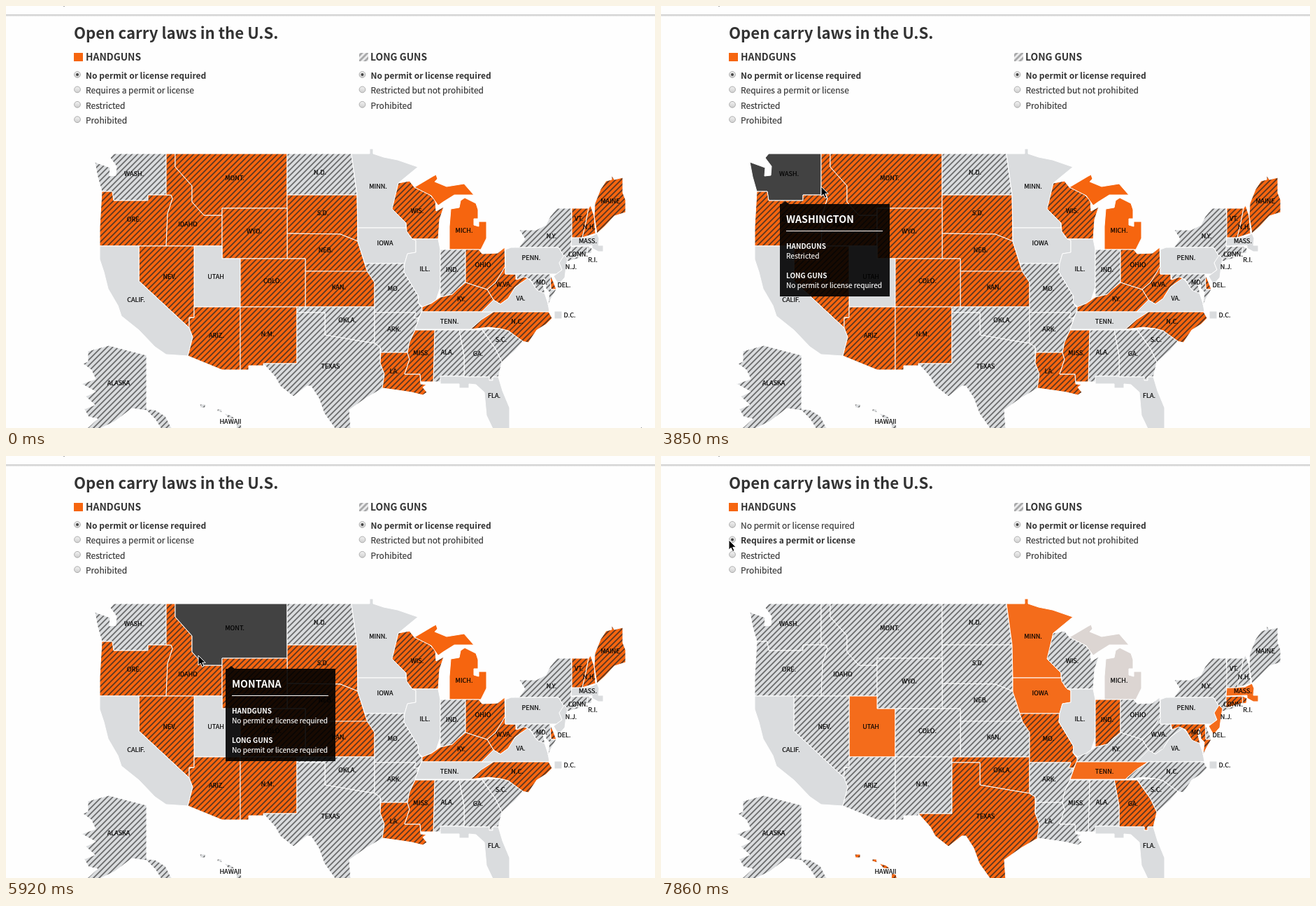
Recreate the animation shown at these times as an HTML page. Size 928x603 px, loop 8 s.

```html
<!DOCTYPE html>
<html lang="en">
<head>
<meta charset="utf-8">
<title>Open carry laws</title>
<style>
html, body { margin: 0; width: 100%; height: 100%; overflow: hidden; background: #fefefe; }
svg { display: block; width: 928px; height: 603px; --on: #f6650f; --off: #dadcde;
  font-family: "Noto Sans CJK SC", "Noto Sans CJK JP", "Noto Sans CJK KR", "Noto Sans CJK", "Open Sans", sans-serif; }
text { fill: #333; }
.title { font-size: 22.2px; font-weight: 700; }
.head { font-size: 13.9px; font-weight: 600; }
.option { font-size: 12px; }
.option text { stroke: #333; stroke-width: .15px; }
.option.picked text { font-weight: 700; stroke: none; }
.option .dot { display: none; }
.option.picked .dot { display: block; }
#states path { fill: var(--off); stroke: #fff; stroke-width: 1; stroke-linejoin: round; }
#states .h { fill: url(#offHatch); }
.none .o, .permit .p { fill: var(--on) !important; }
.none .o.h, .permit .p.h { fill: url(#onHatch) !important; }
.permit .in { fill: var(--fadeIn) !important; }
.permit .out { fill: var(--fadeOut) !important; }
#states .hover { fill: #424242 !important; }
#labels text { font-size: 9.1px; fill: #000; stroke: #000; stroke-width: .2px; text-anchor: middle; }
#tip text { fill: #fff; font-size: 10.1px; stroke: #fff; stroke-width: .15px; }
#tip .b { font-weight: 700; font-size: 10px; stroke: none; }
#tip #place { font-size: 14.2px; font-weight: 600; stroke: none; }
</style>
</head>
<body>
<svg id="stage" class="none" viewBox="0 0 928 603">
<defs>
  <path id="slash" d="M-2 2L2 -2M-2 10L10 -2M6 10L10 6"/>
  <pattern id="offHatch" width="8" height="8" patternUnits="userSpaceOnUse">
    <rect width="8" height="8" fill="#dadcde"/><use href="#slash" stroke="#6b6c6d" stroke-width="1.8"/>
  </pattern>
  <pattern id="onHatch" width="8" height="8" patternUnits="userSpaceOnUse">
    <rect width="8" height="8" fill="#f6650f"/><use href="#slash" stroke="#5c3722" stroke-width="1.8"/>
  </pattern>
  <pattern id="keyHatch" width="8" height="8" patternUnits="userSpaceOnUse">
    <rect width="8" height="8" fill="#ececed"/><use href="#slash" stroke="#a8a9aa" stroke-width="2.8"/>
  </pattern>
  <linearGradient id="knob" x2="0" y2="1"><stop stop-color="#f2f2f2"/><stop offset="1" stop-color="#cfcfcf"/></linearGradient>
  <linearGradient id="shade" x2="0" y2="1"><stop stop-color="#c2c2c2"/><stop offset="1" stop-color="#fefefe"/></linearGradient>
</defs>

<rect x="82" width="2" height="1" fill="#aaa"/>
<rect y="12" width="928" height="3.5" fill="url(#shade)"/>

<text class="title" x="97" y="46.5">Open carry laws in the U.S.</text>
<rect x="97" y="67" width="13" height="12" fill="#f6650f"/>
<text class="head" x="114" y="77.8">HANDGUNS</text>
<rect x="505" y="67" width="13" height="12" fill="url(#keyHatch)"/>
<text class="head" x="521" y="77.8">LONG GUNS</text>
<g id="options"></g>

<g id="states">
  <path id="wash" class="h" d="M127 223L149 231 148 243 157 242 158 229 149 217 154 211H229V270H203V278H154L152 265H137L131 244Z"/>
  <path class="h o" d="M137 265H152L154 278H203V270H236L238 275 231 297 229 343H134V316Z"/>
  <path id="idaho" class="h o" d="M229 211H242V230L266 257V280L283 299H309V343H229L231 297 238 275 236 270H229Z"/>
  <path id="mont" class="h o" d="M242 211H402V289H309V299H283L266 280V257L242 230Z"/>
  <path class="h" d="M402 211H494L498 240 502 270H402Z"/>
  <path class="h o" d="M402 270H502L503 336 478 326 402 325Z"/>
  <path class="h o" d="M402 325L478 326 503 336 508 352 513 368 517 380 428 379V361H402Z"/>
  <path class="h o" d="M428 379H517L525 389 527 395V430H428Z"/>
  <path class="h o" d="M309 289H402V361H309Z"/>
  <path class="in" d="M269 343H309V361H335V430H269Z"/>
  <path class="h o" d="M335 361H428V430H335Z"/>
  <path class="h o" d="M190 343H269V445H262V460L190 393Z"/>
  <path d="M134 343H190V393L262 460 267 473 260 500 229 498 213 487 190 463 165 443 160 428 146 404 140 380 134 362Z"/>
  <path class="h o" d="M269 430H335V520H309L260 500 267 473 262 460V446L269 445Z"/>
  <path class="h o" d="M335 430H416V511H368V514H347V520H335Z"/>
  <path class="h p" d="M416 430H527V482L497 477 456 470V438H416Z"/>
  <path class="h p" d="M416 438H456V470L497 477 527 482 535 487V510L541 526 539 546 515 560 491 577 493 606H472L455 582 447 560 436 543H430L411 558 392 543 385 530 368 511H416Z"/>
  <path class="in" d="M494 211H520V204H525V211L540 216 560 220 589 230 561 253 553 290 558 296 572 310V317H503L502 270Z"/>
  <path class="in" d="M503 317H572L578 330 586 335V352L574 354 570 368H513L508 352 503 337Z"/>
  <path class="h p" d="M513 368H570L569 380 581 400 590 415 589 424 596 433 590 446H583L586 438H527V395L517 380Z"/>
  <path class="h" d="M527 438H586L583 446H590L585 462 577 480 574 495H536L535 487 527 482Z"/>
  <path class="h o" d="M536 495H574L577 505 570 526H592L593 540 601 541 596 545 602 552 596 556 580 552 560 549 538 546 541 526 535 510Z"/>
  <path class="h o" d="M561 253L577 250 584 259 604 268 614 278 615 293 626 287 620 305 618 333H581L573 322 572 310 558 296 552 290Z"/>
  <path class="o out" d="M584 259L611 243 615 241 617 247 613 251 630 258 655 254 669 270H641L625 280 618 285 608 271ZM636 290L648 288 650 278 656 274 672 282 675 291V304H669V313L676 315V308H687V332L679 348H634V315Z"/>
  <path d="M581 333H618L621 348V402L615 420 608 425 596 430 589 424 590 415 581 400 569 380 570 368 574 354 586 352V335Z"/>
  <path class="h p" d="M621 348H657V395L645 405 638 412 621 416Z"/>
  <path class="h o" d="M657 348H676L681 354 703 353 713 345 714 372 700 395 688 405 672 400 657 395Z"/>
  <path class="h o" d="M714 366V383H729V391L740 386 751 388 736 396 728 402 718 418 707 426 697 420 688 405 700 395 714 372Z"/>
  <path class="h o" d="M595 430L608 425 621 416 638 412 645 405 657 395 672 400 688 405 697 420 690 429 680 437H595Z"/>
  <path class="in" d="M594 437H697L680 448 664 462H585Z"/>
  <path d="M680 437L697 420 707 426 718 418 728 402 736 396 746 389 752 395 757 403 770 410 775 425 777 437Z"/>
  <path class="h o" d="M697 437H776L781 446 772 455 759 463 747 481 738 479 718 464 706 461 690 459 664 462 680 448Z"/>
  <path class="h" d="M681 462L706 461 718 464 739 479 728 492 709 509 700 490Z"/>
  <path class="h p" d="M648 463H681L700 490 709 509 704 530H696V535H691V530H655V500Z"/>
  <path class="h" d="M613 463H648L655 500V529H622V537H611Z"/>
  <path class="h o" d="M585 463H613L611 537H593L592 526H570L577 505 574 495 577 480Z"/>
  <path d="M621 529H655V530H691V535H696V530H704L710 550 720 574V606H697L687 585 684 552 672 541 662 540V546H648V540H621Z"/>
  <path class="h" d="M734 320H758L772 313 778 301 788 289H808L810 315 808 342 809 358 824 359 803 365 798 358 790 345H714L734 344 742 333Z"/>
  <path d="M714 348L722 345H790L798 358 791 367 795 377 787 383H714Z"/>
  <path class="in" d="M798 356L803 361 801 372 799 388 790 398 783 386 795 377 791 367Z"/>
  <path class="h o" d="M778 384L782 392 787 405H779Z"/>
  <path class="h p" d="M729 383H778L779 405H787L781 415 775 427 777 409 772 404 770 389 768 399 771 411 759 406 750 391 741 387 731 391Z"/>
  <path class="h p" d="M808 344L831 343 832 353 808 360Z"/>
  <path class="h p" d="M831 343L838 346 837 353 832 354Z"/>
  <path class="in" d="M809 331L835 330 845 325 848 332 847 342H854V351H847L838 346V342L808 343Z"/>
  <path class="h o" d="M809 289H833L829 310 824 331H809Z"/>
  <path class="h o" d="M833 289L836 285 841 300 843 325 824 331 829 310Z"/>
  <path class="h o" d="M842 282L850 262 858 250 866 248V242L870 248 882 245V267L886 277V295L870 300 856 315 845 325 841 300Z"/>
  <path class="h" d="M110 511L117 508V493L147 485 170 491 201 499V576L213 577 228 586 238 606H223L213 590 201 578 180 575 155 594 130 606H113L131 590 118 587 112 576 127 570 114 558 128 551 108 540 128 533 122 520Z"/>
  <path class="h p" d="M277 569H285V574H278ZM302 576H308L309 581 302 579ZM312 582L322 585 328 590 318 589ZM330 596L336 598 338 606H329Z"/>
  <path d="M784 436h11v11h-11z"/>
</g>

<g id="labels">
  <text x="183" y="243">WASH.</text><text x="183" y="308">ORE.</text><text x="260" y="315">IDAHO</text>
  <text x="327" y="249">MONT.</text><text x="449" y="241">N.D.</text><text x="453" y="299">S.D.</text>
  <text x="355" y="325">WYO.</text><text x="457" y="352">NEB.</text><text x="234" y="390">NEV.</text>
  <text x="300" y="390">UTAH</text><text x="381" y="396">COLO.</text><text x="476" y="405">KAN.</text>
  <text x="186" y="423">CALIF.</text><text x="301" y="474">ARIZ.</text><text x="374" y="472">N.M.</text>
  <text x="488" y="452">OKLA.</text><text x="555" y="465">ARK.</text><text x="554" y="407">MO.</text>
  <text x="464" y="518">TEXAS</text><text x="555" y="525">LA.</text><text x="594" y="499">MISS.</text>
  <text x="631" y="498">ALA.</text><text x="675" y="500">GA.</text><text x="698" y="560">FLA.</text>
  <text x="708" y="480">S.C.</text><text x="731" y="454">N.C.</text><text x="634" y="454">TENN.</text>
  <text x="651" y="422">KY.</text><text x="736" y="421">VA.</text><text x="712" y="401">W.VA.</text>
  <text x="682" y="373">OHIO</text><text x="638" y="380">IND.</text><text x="599" y="379">ILL.</text>
  <text x="542" y="342">IOWA</text><text x="532" y="261">MINN.</text><text x="588" y="296">WIS.</text>
  <text x="655" y="324">MICH.</text><text x="751" y="363">PENN.</text><text x="780" y="332">N.Y.</text>
  <text x="819" y="307">VT.</text><text x="834" y="319">N.H.</text><text x="864" y="282">MAINE</text>
  <text x="832" y="339">MASS.</text><text x="818" y="358">CONN.</text><text x="839" y="366">R.I.</text>
  <text x="808" y="376">N.J.</text><text x="766" y="398">MD.</text><text x="798" y="402">DEL.</text>
  <text x="806" y="445">D.C.</text><text x="161" y="542">ALASKA</text><text x="321" y="597">HAWAII</text>
</g>

<g id="tip">
  <path d="M3 0L8 -4 13 0H157V132H0V0Z" fill="#000" opacity=".9"/>
  <text id="place" x="9" y="27"></text>
  <path d="M9 38.5H147" stroke="#fff"/>
  <text class="b" x="9" y="64">HANDGUNS</text>
  <text id="rule" x="9" y="78"></text>
  <text class="b" x="9" y="106">LONG GUNS</text>
  <text x="9" y="120">No permit or license required</text>
</g>
<path id="cursor" d="M0 0V14L3.2 11.2 5.6 16.4 8 15.3 5.7 10.3H10.2Z" fill="#000" stroke="#fff" stroke-width="1"/>
</svg>

<script>
const LOOP = 8000, CLICK = 7120;
const find = id => document.getElementById(id);
const stage = find("stage"), cursor = find("cursor"), tip = find("tip");

const columns = [
  [102, ["No permit or license required", "Requires a permit or license", "Restricted", "Prohibited"]],
  [509.5, ["No permit or license required", "Restricted but not prohibited", "Prohibited"]]
];
find("options").innerHTML = columns.map(([x, names]) => names.map((name, i) => {
  const y = 98 + 21.4 * i;
  return `<g class="option${i ? "" : " picked"}">
    <circle cx="${x}" cy="${y}" r="4.4" fill="url(#knob)" stroke="#a5a5a5" stroke-width=".9"/>
    <circle class="dot" cx="${x}" cy="${y}" r="2" fill="#444"/>
    <text x="${x + 12}" y="${y + 5.8}">${name}</text></g>`;
}).join("")).join("");
const options = document.querySelectorAll(".option");

const tips = {
  wash: { x: 170, y: 283, place: "WASHINGTON", rule: "Restricted" },
  idaho: { x: 261, y: 348, place: "IDAHO", rule: "No permit or license required" },
  mont: { x: 314, y: 304, place: "MONTANA", rule: "No permit or license required" }
};

// time, pointer x, pointer y, hovered state
const moves = [
  [0, 908, 601], [150, 908, 640],
  [1200, 892, 528], [1350, 884, 506], [1490, 880, 495],
  [1790, 830, 425], [1940, 690, 230], [2080, 430, 165], [2230, 180, 96], [2370, 97, 121],
  [2820, 105, 135], [2970, 130, 175], [3110, 160, 216, "wash"], [3260, 185, 238, "wash"], [3410, 200, 250, "wash"],
  [3700, 218, 256, "wash"], [3850, 229, 258, "wash"], [3990, 245, 255, "idaho"], [4140, 265, 249, "mont"],
  [4440, 272, 258, "mont"], [4590, 285, 275, "mont"], [4740, 292, 283, "mont"],
  [5040, 290, 290, "mont"], [5190, 281, 300, "idaho"], [5330, 278, 301, "idaho"],
  [5780, 275, 285, "mont"], [5930, 258, 240, "mont"], [6080, 220, 216, "wash"], [6220, 165, 170],
  [6370, 125, 138], [6520, 104, 112], [6670, 97, 107], [6820, 97, 120]
];

const off = [218, 220, 222], on = [246, 101, 15];
const mix = (a, b, p) => `rgb(${a.map((v, i) => Math.round(v + (b[i] - v) * p))})`;
const easeInOut = t => t < .5 ? 4 * t ** 3 : 1 - 4 * (1 - t) ** 3;

function fadeAt(time) {
  if (time < 7410) return 0;
  const held = 7410 + 150 * Math.floor((time - 7410) / 150);
  return easeInOut((held - 7270) / 783);
}

function draw(time) {
  const [, x, y, hover] = moves.findLast(move => move[0] <= time);
  cursor.setAttribute("transform", `translate(${x} ${y})`);

  for (const id in tips) find(id).classList.toggle("hover", id === hover);
  tip.style.display = hover ? "" : "none";
  if (hover) {
    const info = tips[hover];
    tip.setAttribute("transform", `translate(${info.x} ${info.y})`);
    find("place").textContent = info.place;
    find("rule").textContent = info.rule;
  }

  const clicked = time >= CLICK;
  stage.setAttribute("class", clicked ? "permit" : "none");
  options[0].classList.toggle("picked", !clicked);
  options[1].classList.toggle("picked", clicked);
  const p = fadeAt(time);
  stage.style.setProperty("--fadeIn", mix(off, on, p));
  stage.style.setProperty("--fadeOut", mix(on, off, p));
}

const start = performance.now();
function tick() {
  draw((performance.now() - start) % LOOP);
  requestAnimationFrame(tick);
}
tick();
</script>
</body>
</html>
```
